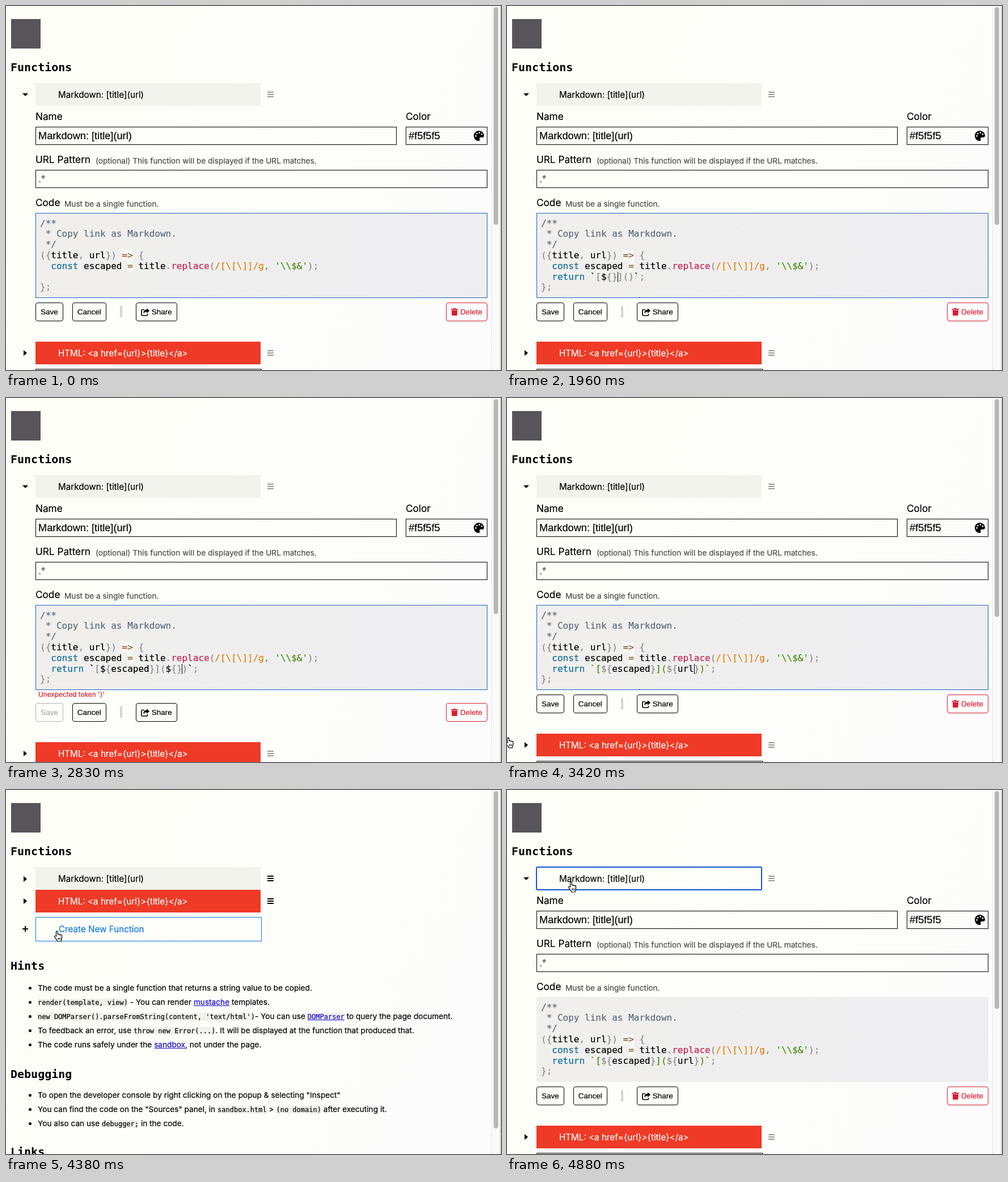
Recreate the animation shown at these times as an HTML page. Size 873x642 px, loop 4.93 s.

```html
<!DOCTYPE html>
<html lang="en">
<head>
<meta charset="utf-8">
<title>Functions</title>
<style>
html, body { margin: 0; width: 100%; height: 100%; overflow: hidden; }
#stage { position: relative; width: 873px; height: 642px; overflow: hidden; color: #000;
  background: linear-gradient(115deg, #fefef8 10%, #fdfdfb 60%, #fcfcfd);
  font: 13.65px/20px Inter, "Open Sans", sans-serif; -webkit-text-stroke: .2px; }
#stage > *, #form > *, #rest > * { position: absolute; }
#form, #rest { left: 0; top: 0; width: 857px; }
.logo { left: 9px; top: 23px; width: 52px; height: 52px; background: #57545a; }
h2 { left: 8px; margin: 0; font: bold 20px/24px "DejaVu Sans Mono", monospace; -webkit-text-stroke: 0; }
.bar { left: 52px; width: 397px; height: 40px; box-sizing: border-box; padding-left: 40px;
  font-size: 15.2px; line-height: 41px; white-space: pre; }
#title { top: 136px; background: #f3f3ee; }
#title.hover { background: none; }
#title.focus { outline: 2px solid #1257cc; outline-offset: -1px; border-radius: 2px; }
.html { top: 0; background: #ee3a26; color: #fff; }
#create { top: 48px; width: 399px; height: 43px; border: 1px solid #000; }
#create.hover { color: #0f7be0; border-color: #0f7be0; }
.arrow { left: 31px; width: 6px; height: 10px; background: #000; clip-path: polygon(0 0, 100% 50%, 0 100%); }
.arrow.open { left: 29px; width: 10px; height: 5px; margin-top: 2px; clip-path: polygon(0 0, 100% 0, 50% 100%); }
.grip { left: 461px; width: 11px; height: 10px; color: #000;
  background: repeating-linear-gradient(currentColor 0 2px, transparent 2px 4px); }
.editing .grip { color: #999; }
.plus { left: 29px; top: 64px; width: 10px; height: 10px;
  background: linear-gradient(#000, #000) 0 4px / 10px 2px no-repeat, linear-gradient(#000, #000) 4px 0 / 2px 10px no-repeat; }
label { font-size: 17.2px; white-space: pre; }
.note { color: #4c4c4c; white-space: pre; }
.field { height: 32px; box-sizing: border-box; border: 1px solid #000; padding-left: 4px;
  font: 18.2px/30px "Liberation Sans", Arial, sans-serif; }
#code { left: 52px; top: 365px; width: 797px; height: 150px; box-sizing: border-box; margin: 0;
  padding: 8.6px 7px; border: 1px solid transparent;
  background: linear-gradient(100deg, #f0efed, #eeeef1) border-box;
  font: 16px/18.8px "DejaVu Sans Mono", monospace; }
#code.focus { border-color: #1c62c0; }
#code i { font-style: normal; }
.comment { color: #5d6977; }
.regex { color: #d6860c; }
.string { color: #488a0a; }
.keyword { color: #0d6c99; }
.call { color: #c7244f; }
.op { color: #805c2e; background: #fff8; }
.punct { color: #8a8a8a; }
.name { color: #000; }
#caret { width: 1px; height: 18px; top: 469px; background: #000; }
#error { left: 57px; top: 513px; font-size: 11.8px; color: #d3202f; white-space: pre; }
#tools { left: 52px; top: 523px; width: 797px; display: flex; gap: 16px; }
#tools b { display: flex; align-items: center; gap: 4px; height: 33px; box-sizing: border-box; padding: 0 8px;
  border: 1px solid #000; border-radius: 4px; font: 13.5px/31px "Liberation Sans", Arial, sans-serif; }
#tools u { width: 4px; height: 20px; margin: 6px 8px; background: #d4d4da; }
#tools b.off { color: #aaa; border-color: #b4b4b4; }
#tools b.del { margin-left: auto; color: #d71f30; border-color: #d71f30; }
li { left: 56px; list-style: none; white-space: pre; }
li::before { content: ""; position: absolute; left: -16px; top: 8px; width: 5px; height: 5px; border-radius: 50%; background: #000; }
code { font: 12px "DejaVu Sans Mono", monospace; background: #f1f1eb; }
a { color: #1608d0; text-decoration: underline; }
.track { left: 856px; top: 0; width: 15px; height: 642px; background: #fafafa; border-left: 1px solid #e6e6e6; }
.edge { left: 871px; top: 0; width: 2px; height: 642px; background: #d2d2d2; }
#thumb { left: 860px; top: 2px; width: 8px; border-radius: 4px; background: #b7b7b7; }
#hand { left: 0; top: 0; }
[hidden] { display: none !important; }
</style>
</head>
<body>
<div id="stage">
  <div class="logo"></div>
  <h2 style="top:96px">Functions</h2>
  <div id="arrow" class="arrow" style="top:152px"></div>
  <div id="title" class="bar">Markdown: [title](url)</div>
  <div class="grip" style="top:151px"></div>

  <div id="form">
    <label style="left:52px;top:185px">Name</label>
    <label style="left:705px;top:185px">Color</label>
    <div class="field" style="left:52px;top:213px;width:637px">Markdown: [title](url)</div>
    <div class="field" style="left:705px;top:213px;width:144px">#f5f5f5</div>
    <svg style="left:825px;top:220px" width="18" height="18">
      <path d="M9 0C4 0 0 4 0 9s4 9 8.500 9c2.300 0 2.500-1.500 1.800-3-.8-1.700.3-3.200 2-3.200H15c1.700 0 3-1.200 3-3C18 4 14 0 9 0Z"/>
      <g fill="#fff"><circle cx="3.700" cy="9.200" r="1.300"/><circle cx="5.500" cy="5" r="1.300"/><circle cx="10" cy="3.400" r="1.300"/><circle cx="14" cy="6.300" r="1.300"/></g>
    </svg>
    <label style="left:52px;top:261px">URL Pattern</label>
    <span class="note" style="left:158px;top:263px">(optional) This function will be displayed if the URL matches.</span>
    <div class="field" style="left:52px;top:289px;width:797px;color:#555">.*</div>
    <label style="left:52px;top:337px">Code</label>
    <span class="note" style="left:103px;top:339px">Must be a single function.</span>
    <pre id="code"></pre>
    <div id="caret"></div>
    <div id="error"></div>
    <div id="tools">
      <b id="save">Save</b><b>Cancel</b><u></u>
      <b><svg width="15" height="14"><path d="M6 2.500H2.500Q1 2.500 1 4v7.500Q1 13 2.500 13H10q1.500 0 1.500-1.500V10" fill="none" stroke="#000" stroke-width="1.700"/><path d="M10 0l5 4.500-5 4.500V6.300C7 6.200 5.500 7 5.500 10 3 6 5.500 2.800 10 2.700Z"/></svg>Share</b>
      <b class="del"><svg width="12" height="13" fill="currentColor"><path d="M0 1h3.500l.7-1h3.600l.7 1H12v1.700H0ZM.8 3.500h10.400L10.600 13H1.400Z"/></svg>Delete</b>
    </div>
  </div>

  <div id="rest">
    <div class="arrow" style="top:15px"></div>
    <div class="bar html">HTML: &lt;a href={url}&gt;{title}&lt;/a&gt;</div>
    <div class="grip" style="top:15px"></div>
    <div class="plus"></div>
    <div id="create" class="bar">Create New Function</div>
    <h2 style="top:122px">Hints</h2>
    <li style="top:163px">The code must be a single function that returns a string value to be copied.</li>
    <li style="top:188px"><code>render(template, view)</code> - You can render <a>mustache</a> templates.</li>
    <li style="top:213px"><code>new DOMParser().parseFromString(content, 'text/html')</code>- You can use <a><code>DOMParser</code></a> to query the page document.</li>
    <li style="top:238px">To feedback an error, use <code>throw new Error(...)</code>. It will be displayed at the function that produced that.</li>
    <li style="top:263px">The code runs safely under the <a>sandbox</a>, not under the page.</li>
    <h2 style="top:313px">Debugging</h2>
    <li style="top:352px">To open the developer console by right clicking on the popup &amp; selecting "Inspect"</li>
    <li style="top:377px">You can find the code on the "Sources" panel, in <code>sandbox.html</code> &gt; <code>(no domain)</code> after executing it.</li>
    <li style="top:402px">You also can use <code>debugger;</code> in the code.</li>
    <h2 style="top:450px">Links</h2>
  </div>

  <div class="track"></div>
  <div class="edge"></div>
  <div id="thumb"></div>
  <svg id="hand" width="17" height="21">
    <path d="M4.500 10V2.300a1.400 1.400 0 0 1 2.800 0V7c.4-1 2.400-.9 2.600.3.500-.8 2.300-.7 2.500.6.600-.6 2.100-.3 2.100 1V13c0 3-1.500 3.500-1.500 6H6.800C6.500 16.500 3.500 14.500 1.700 11.500.8 9.500 2.800 8.500 4.500 10Z" fill="#fff" stroke="#000" stroke-width="1.200"/>
    <path d="M7.800 12.500v3.500M9.900 12.500v3.500M12 12.500v3.500" stroke="#000"/>
  </svg>
</div>

<script>
const LOOP = 4930;
const $ = id => document.getElementById(id);

// Keystrokes: start, interval, keys; "<" and ">" move the caret
const TYPING = [
  [120, 75, "return `"], [740, 0, "`"], [870, 0, ";"], [950, 70, "<<"],
  [1130, 75, "[]()"], [1440, 70, "<<<"], [1760, 80, "${}"],
  [2040, 0, "<"], [2110, 60, "escaped"], [2530, 50, ">>>"],
  [2690, 50, "${}"], [2930, 0, "<"], [3000, 70, "url"]
];
const ERRORS = [
  [685, 745, "Unterminated template literal"],
  [1985, 2150, "Unexpected token '}'"],
  [2800, 3050, "Unexpected token '}'"]
];
const POINTER = [
  [3400, -6, 600], [3600, 68, 534], [3700, 68, 534], [3950, 28, 153],
  [4100, 28, 153], [4380, 84, 248], [4640, 107, 161]
];
const BLUR = 3620, SAVED = 3660, CLOSE = 4080, REOPEN = 4720;

const HEAD = String.raw`/**
 * Copy link as Markdown.
 */
({title, url}) => {
  const escaped = title.replace(/[\[\]]/g, '\\$&');
`;
const KINDS = ["comment", "regex", "string", "keyword", "call", "op", "punct"];
const TOKENS = /(\/\*[\s\S]*?\*\/)|(\/\[.*\/g)|('[^']*'|`(?:\$\{[^}]+\}|(?!\$\{)[^`])*`)|\b(const|return)\b|(\w+)(?=\()|(=>|=)|([{}()[\];,.])/g;

const span = (kind, text) => `<i class="${kind}">${text}</i>`;
const escapeHtml = s => s.replace(/&/g, "&amp;").replace(/</g, "&lt;").replace(/>/g, "&gt;");

function highlight(source) {
  return source.replace(TOKENS, (text, ...groups) => {
    const kind = KINDS[groups.slice(0, KINDS.length).findIndex(g => g !== undefined)];
    let inner = escapeHtml(text);
    if (text[0] === "`") {
      inner = inner.replace(/\$\{([^}]+)\}/g, (_, name) =>
        span("punct", "${") + span("name", name) + span("punct", "}"));
    }
    return span(kind, inner);
  });
}

function typedAt(t) {
  let text = "", caret = 0;
  for (const [start, gap, keys] of TYPING) {
    [...keys].forEach((key, i) => {
      if (t < start + i * gap) return;
      if (key === "<") caret--;
      else if (key === ">") caret++;
      else {
        text = text.slice(0, caret) + key + text.slice(caret);
        caret++;
      }
    });
  }
  return { text, caret };
}

function pointerAt(t) {
  const next = POINTER.findIndex(p => p[0] > t);
  if (next < 1) return POINTER[next < 0 ? POINTER.length - 1 : 0].slice(1);
  const [t0, x0, y0] = POINTER[next - 1], [t1, x1, y1] = POINTER[next];
  const k = (t - t0) / (t1 - t0), e = k * k * (3 - 2 * k);
  return [x0 + (x1 - x0) * e, y0 + (y1 - y0) * e];
}

let shown = null;

function render(t) {
  const open = t < CLOSE || t >= REOPEN;
  const focus = t < BLUR;
  const error = ERRORS.find(([from, to]) => t >= from && t < to);
  const shift = error ? 15 : 0;
  const { text, caret } = typedAt(t);
  const [x, y] = pointerAt(t);
  const pointing = t >= POINTER[0][0];
  const over = (top, bottom) => pointing && x > 45 && y > top && y < bottom;

  if (text !== shown) {
    $("code").innerHTML = highlight(HEAD + "  " + text + "\n};");
    shown = text;
  }
  $("stage").classList.toggle("editing", open);
  $("arrow").classList.toggle("open", open);
  $("form").hidden = !open;
  $("code").classList.toggle("focus", focus);
  $("caret").hidden = !focus || t < 80;
  $("caret").style.left = 60 + (caret + 2) * 9.632 + "px";

  $("error").textContent = error ? error[2] : "";
  $("tools").style.transform = `translateY(${shift}px)`;
  $("save").textContent = t >= SAVED && t < CLOSE ? "Saved" : "Save";
  $("save").classList.toggle("off", !!error);

  $("rest").style.transform = `translateY(${open ? 592 + shift : 176}px)`;
  $("thumb").style.height = (open ? (error ? 379 : 384) : 595) + "px";
  $("create").classList.toggle("hover", !open && over(223, 265));
  $("title").classList.toggle("hover", t > CLOSE && over(135, 175));
  $("title").classList.toggle("focus", t >= REOPEN);

  $("hand").style.display = pointing ? "" : "none";
  $("hand").style.transform = `translate(${x}px, ${y}px)`;
}

function tick() {
  render(performance.now() % LOOP);
  requestAnimationFrame(tick);
}
tick();
</script>
</body>
</html>
```
